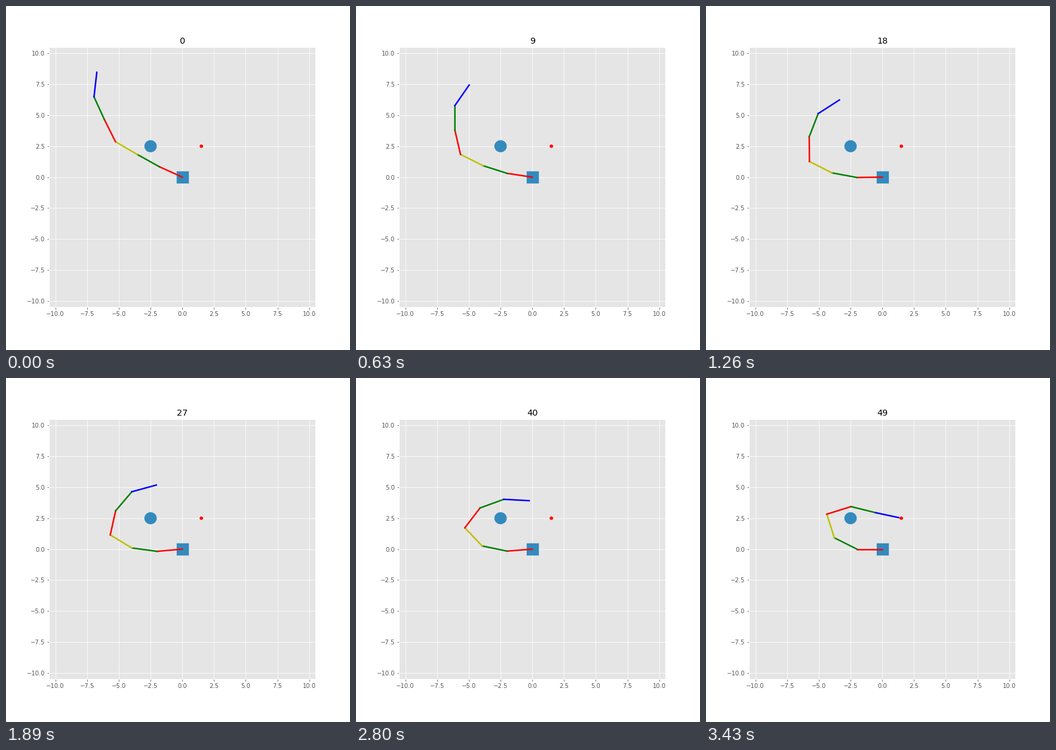
A matplotlib script for the animation above (3.5 s loop, 576x576 px).

```python
import numpy as np
import matplotlib.pyplot as plt
from matplotlib.animation import FuncAnimation
from matplotlib.patches import Circle, Rectangle

FRAMES, INTERVAL = 50, 70
LENGTH = 2.0
LINK_COLORS = "rgyrgb"

# Absolute link angles in degrees, base link first
START = np.array([155, 150.3, 149, 116, 114, 83.7])
END = np.array([180, 152.7, 107.2, 17.8, -14.2, -12.4])
# How far each link swings off the straight blend, and how lopsidedly
BOW = np.array([71, 83, 78, 39, -5, -85])
SKEW = np.array([28, 0, 0, -30, -28, -8])


def joints(frame):
    """Joint positions of the arm, from the base to the tip."""
    t = frame / (FRAMES - 1)
    u = 0.88 * t + 0.12 * t ** 8  # speeds up on the final approach
    angles = START + (END - START) * u
    angles += u * (1 - u) * (BOW + SKEW * (1 - 2 * u))
    a = np.radians(angles)
    steps = LENGTH * np.column_stack([np.cos(a), np.sin(a)])
    return np.vstack([np.zeros(2), np.cumsum(steps, axis=0)])


plt.style.use("ggplot")
plt.rcParams.update({"font.family": "DejaVu Sans", "font.size": 10,
                     "figure.subplot.bottom": 0.125})
fig, ax = plt.subplots(figsize=(8, 8), dpi=72)
ax.set(xlim=(-10.5, 10.5), ylim=(-10.5, 10.5))
title = ax.set_title("0")

edge = dict(edgecolor="#EEEEEE", linewidth=0.5)
ax.add_patch(Rectangle((-0.5, -0.5), 1, 1, facecolor="#348ABD", **edge))
ax.add_patch(Circle((-2.5, 2.5), 0.5, facecolor="#348ABD", **edge))
ax.add_patch(Circle((1.5, 2.5), 0.15, facecolor="r", zorder=3, **edge))
links = [ax.plot([], [], color=c, lw=2.5)[0] for c in LINK_COLORS]


def update(frame):
    points = joints(frame)
    for link, a, b in zip(links, points, points[1:]):
        link.set_data(*zip(a, b))
    title.set_text(str(frame))
    return [*links, title]


anim = FuncAnimation(fig, update, frames=FRAMES, interval=INTERVAL,
                     repeat=True, repeat_delay=0, blit=False)
plt.show()
```
